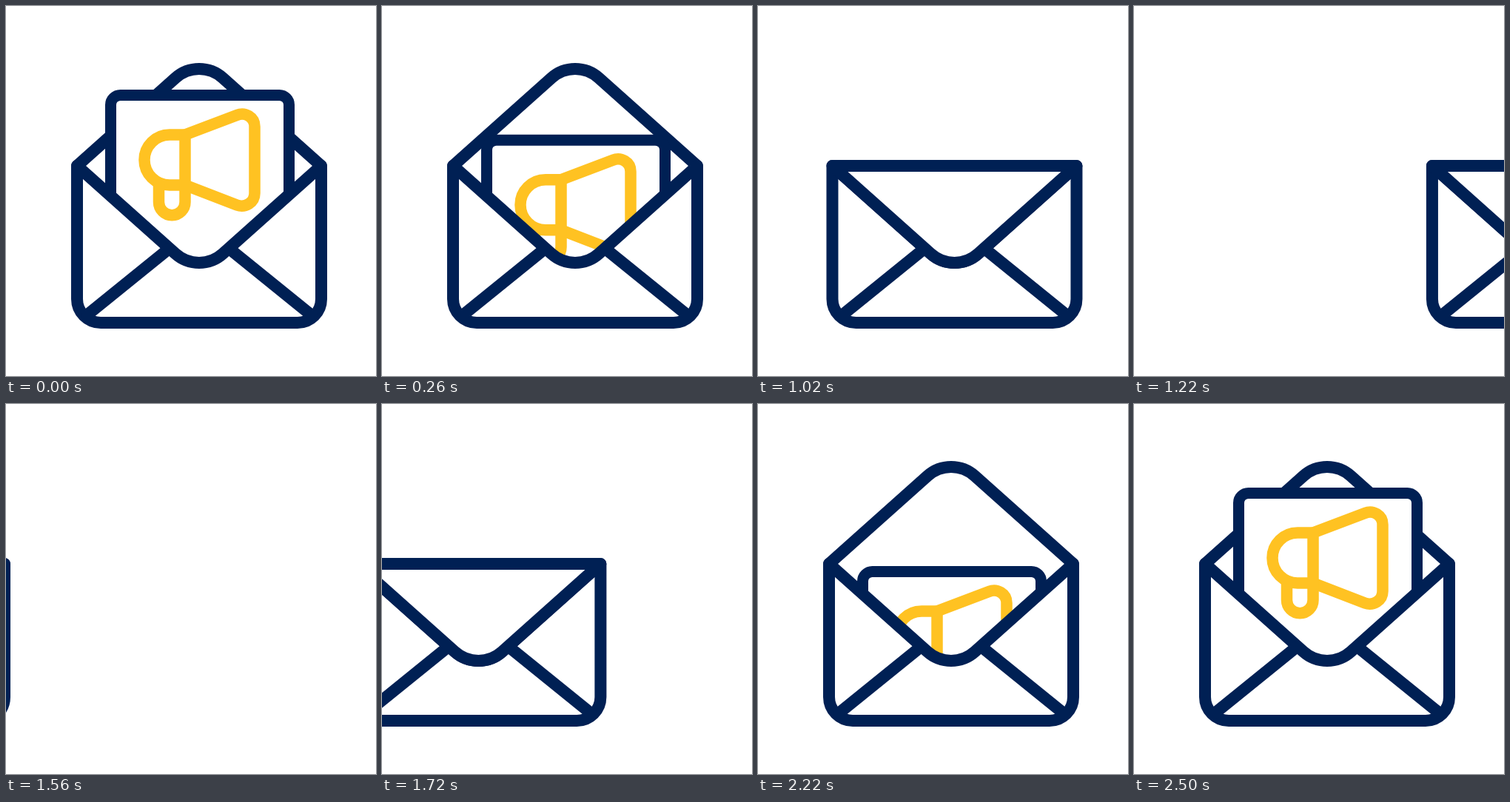
Animation of 500 by 500 pixels, one loop 2680 ms. Source, as an HTML page:

```html
<!DOCTYPE html>
<html lang="en">
<head>
<meta charset="utf-8">
<title>Envelope</title>
<style>
  html, body { margin: 0; width: 100%; height: 100%; overflow: hidden; background: #fff; }
  svg { display: block; width: 100%; height: 100%; }
  path { fill: none; stroke-linecap: round; stroke-linejoin: round; }
  .navy { stroke: #002054; stroke-width: 16; }
  .gold { stroke: #ffc222; stroke-width: 15.5; }
  .paper { fill: #fff; }
  .sheet { stroke-width: 15; }
</style>
</head>
<body>
<svg viewBox="0 0 500 500">
  <g id="envelope">
    <path id="flapBack" class="navy"/>
    <g id="letter">
      <path class="navy paper sheet" d="M141.5 300V133.5a13 13 0 0 1 13-13H369.5a13 13 0 0 1 13 13V300"/>
      <path class="gold" d="M242 242H221a34 34 0 0 1 0-68H242L312 147.5C323 143 336 150 336 163V253C336 266 323 273 312 269L242 242"/>
      <path class="gold" d="M206.5 242V265a17.75 17.75 0 0 0 35.5 0V174"/>
    </g>
    <path id="pocket" class="navy paper"/>
    <path class="navy" d="M109 418L219 329M413 418L303 329"/>
    <path id="flapFront" class="navy paper"/>
  </g>
</svg>
<script>
  const LOOP = 2680, RIM = 216, LETTER_DROP = 114, SLIDE = 468;
  const el = id => document.getElementById(id);

  // Eased progress from 0 to 1 between two times
  const ease = (t, start, end) => {
    const x = Math.min(1, Math.max(0, (t - start) / (end - start)));
    return x * x * (3 - 2 * x);
  };

  // Round-tipped edge along the rim; open = 1 points up, -1 points down
  const flapEdge = open => {
    const y = RIM - 118.7 * open;
    const sweep = open > 0 ? 1 : 0;
    return `M96 ${RIM}L229 ${y}A48 ${48 * Math.abs(open)} 0 0 ${sweep} 293 ${y}L426 ${RIM}`;
  };

  el('pocket').setAttribute('d', flapEdge(-1) + 'V396a32 32 0 0 1-32 32H128a32 32 0 0 1-32-32Z');

  function draw(t) {
    const drop = LETTER_DROP * (ease(t, 0, 500) - ease(t, 2167, 2500));
    const open = 1 - 2 * (ease(t, 503, 843) - ease(t, 1825, 2175));
    const slide = t < 1450
      ? SLIDE * ease(t, 1000, 1365)
      : -SLIDE * (1 - ease(t, 1500, 1839));

    el('letter').setAttribute('transform', `translate(0 ${drop})`);
    el('envelope').setAttribute('transform', `translate(${slide} 0)`);
    el('flapBack').setAttribute('d', open > 0 ? flapEdge(open) : '');
    el('flapFront').setAttribute('d', open > 0 ? '' : flapEdge(open) + 'Z');
  }

  function tick() {
    draw(performance.now() % LOOP);
    requestAnimationFrame(tick);
  }
  tick();
</script>
</body>
</html>
```
